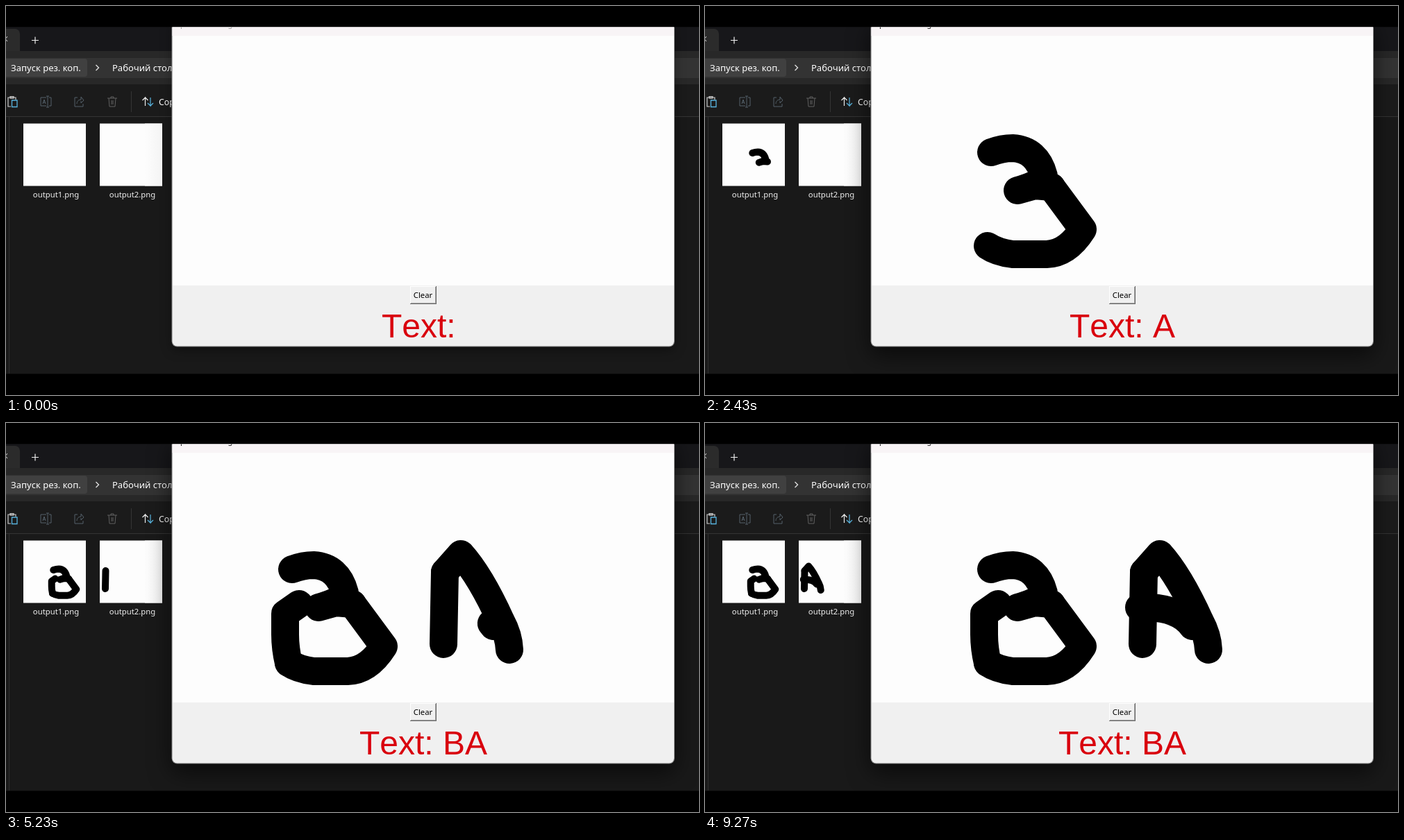
Recreate the animation shown at these times as an HTML page with a canvas. Size 998 by 561 pixels, loop 9300 ms.

```html
<!DOCTYPE html>
<html lang="ru">
<head>
<meta charset="utf-8">
<title>Handwriting demo</title>
<style>
html, body { margin: 0; width: 100%; height: 100%; overflow: hidden; background: #000; }
canvas { display: block; }
</style>
</head>
<body>
<canvas id="stage" width="998" height="561"></canvas>
<script>
const c = document.getElementById('stage').getContext('2d');
const LOOP = 9300;
const UI = '"Noto Sans", "Open Sans", sans-serif';

// A curve the pen follows at constant speed between two times
function pen(start, end, d) {
  const element = document.createElementNS('http://www.w3.org/2000/svg', 'path');
  element.setAttribute('d', d);
  return { start, end, path: new Path2D(d), length: element.getTotalLength() };
}

const strokes = [
  pen(580, 1380, 'M412 211Q428 205 443 205Q478 207 488 245Q486 256 450 266L475 259L499 261'),
  pen(1780, 2430, 'M499 261L544 322Q522 357 492 358H443Q420 355 407 346'),
  pen(2450, 3270, 'M407 346Q402 325 402 305V275L422 261'),
  pen(3860, 4400, 'M630 319L632 215'),
  pen(4750, 5170, 'M632 215L655 189Q683 220 713 286Q724 306 725 327'),
  pen(5210, 5500, 'M702 293Q684 268 640 266'),
  pen(5740, 5770, 'M640 266H625')
];

// Saved state shown in the label and thumbnails
const saves = [
  { time: 0, text: '' },
  { time: 1770, text: 'A' },
  { time: 3830, text: 'B' },
  { time: 4770, text: 'BA' },
  { time: 6130, text: 'BA' }
];
const SAVE_DELAY = 60;

function box(x, y, w, h, color, radii) {
  c.fillStyle = color;
  c.beginPath();
  c.roundRect(x, y, w, h, radii || 0);
  c.fill();
}

function label(text, x, y, font, color, align = 'left') {
  c.font = font;
  c.fillStyle = color;
  c.textAlign = align;
  c.fillText(text, x, y);
}

function line(path, color, width = 1) {
  c.strokeStyle = color;
  c.lineWidth = width;
  c.stroke(new Path2D(path));
}

function drawInk(t) {
  c.save();
  c.strokeStyle = '#000';
  c.lineWidth = 40;
  c.lineCap = c.lineJoin = 'round';
  for (const { start, end, path, length } of strokes) {
    if (t <= start) continue;
    const done = Math.min(1, (t - start) / (end - start));
    c.setLineDash(done < 1 ? [length * done, length * 2] : []);
    c.stroke(path);
  }
  c.restore();
}

function thumbnail(x, inkX, t, name) {
  c.save();
  c.beginPath();
  c.rect(x, 169.5, 90, 90);
  c.clip();
  box(x, 169, 90, 91, '#fdfdfd');
  if (x > 100) {
    const shade = c.createLinearGradient(x + 65, 0, x + 90, 0);
    shade.addColorStop(0, '#fdfdfd');
    shade.addColorStop(1, '#f4f4f4');
    box(x + 65, 169, 25, 91, shade);
  }
  c.translate(x, 170);
  c.scale(0.25, 0.25);
  c.translate(-inkX, -43);
  drawInk(t);
  c.restore();
  label(name, x + 47, 276, '11.3px ' + UI, '#f0f0f0', 'center');
}

function drawExplorer(inkTime) {
  box(0, 30, 998, 501, '#191919');
  box(0, 30, 998, 35, '#17171a');
  box(-10, 33, 30, 34, '#2b2b2b', [0, 7, 0, 0]);
  box(0, 65, 998, 48, '#282828');
  box(0, 75, 998, 29, '#333');
  box(-8, 76, 125, 26, '#404040', 4);
  box(0, 113, 998, 46, '#1b1b1b');
  line('M0 159.5H998', '#343434');
  line('M4.5 160V530', '#303030');
  line('M-4 44L2 51M2 44L-4 51', '#ddd');
  line('M37 49.5H47M42 44.5V54.5', '#eee', 1.2);
  label('Запуск рез. коп.', 7, 94, '13px ' + UI, '#fff');
  line('M129.5 85L133.5 89L129.5 93', '#ddd', 1.4);
  label('Рабочий стол', 153, 94, '13px ' + UI, '#fff');

  line('M7 145H3V132H14V135M6 130.5H11V133H6Z', '#ccc', 1.2);
  line('M8.5 136H16V145.5H8.5Z', '#58b4df', 1.3);
  line('M58 132H50V144H58M62 132H65V144H62M60 130V146M58 130H62M58 146H62', '#55616a');
  line('M53 141L55 135L57 141M54 139H56', '#55616a');
  line('M103 132H99V145H111V141M102 141C102 137 105 135 108 135V131L112 136L108 140V137', '#55616a');
  line('M146 133H160M148 133L149 145H157L158 133M151 133V131H155V133M152 136V142M154 136V142', '#606060');
  line('M180.5 123V153', '#353535');
  line('M200.5 144V132L196.5 136M200.5 132L204.5 136', '#eee', 1.2);
  line('M208 132V144L204 140M208 144L212 140', '#58b4df', 1.2);
  label('Сортировать', 220, 143, '12.3px ' + UI, '#fff');

  thumbnail(25, 239, inkTime, 'output1.png');
  thumbnail(135, 598, inkTime, 'output2.png');
}

function drawWindow(t, text) {
  const active = t >= 570;
  c.shadowColor = active ? 'rgba(0,0,0,.6)' : 'rgba(0,0,0,.35)';
  c.shadowBlur = active ? 32 : 16;
  c.shadowOffsetY = active ? 12 : 5;
  box(238.5, 20, 724.5, 471.5, '#808080', 8);
  c.shadowColor = 'transparent';
  box(239.5, 20, 722.5, 470.5, '#f0f0f0', 7);

  box(239.5, 30, 722.5, 13, '#f8f4f6');
  label('prediction img', 251, 30, '11px ' + UI, active ? '#111' : '#999');
  box(240, 43, 722, 360, '#fdfdfd');
  drawInk(t);

  box(582, 404, 38, 26, '#696969');
  box(582, 404, 37, 25, '#fff');
  box(583, 405, 36, 24, '#a0a0a0');
  box(583, 405, 35, 23, '#f0f0f0');
  label('Clear', 600.5, 421, '11.3px ' + UI, '#000', 'center');
  c.fontKerning = 'none';
  label('Text: ' + text, 601, 478, '48px "Liberation Sans", Arial, sans-serif', '#d9000d', 'center');
  c.fontKerning = 'auto';
}

function frame() {
  const t = performance.now() % LOOP;
  const { time, text } = saves.findLast(save => save.time <= t);
  c.fillStyle = '#000';
  c.fillRect(0, 0, 998, 561);
  c.save();
  c.beginPath();
  c.rect(0, 30.5, 998, 500);
  c.clip();
  drawExplorer(time - SAVE_DELAY);
  drawWindow(t, text);
  c.restore();
  requestAnimationFrame(frame);
}
frame();
</script>
</body>
</html>
```
